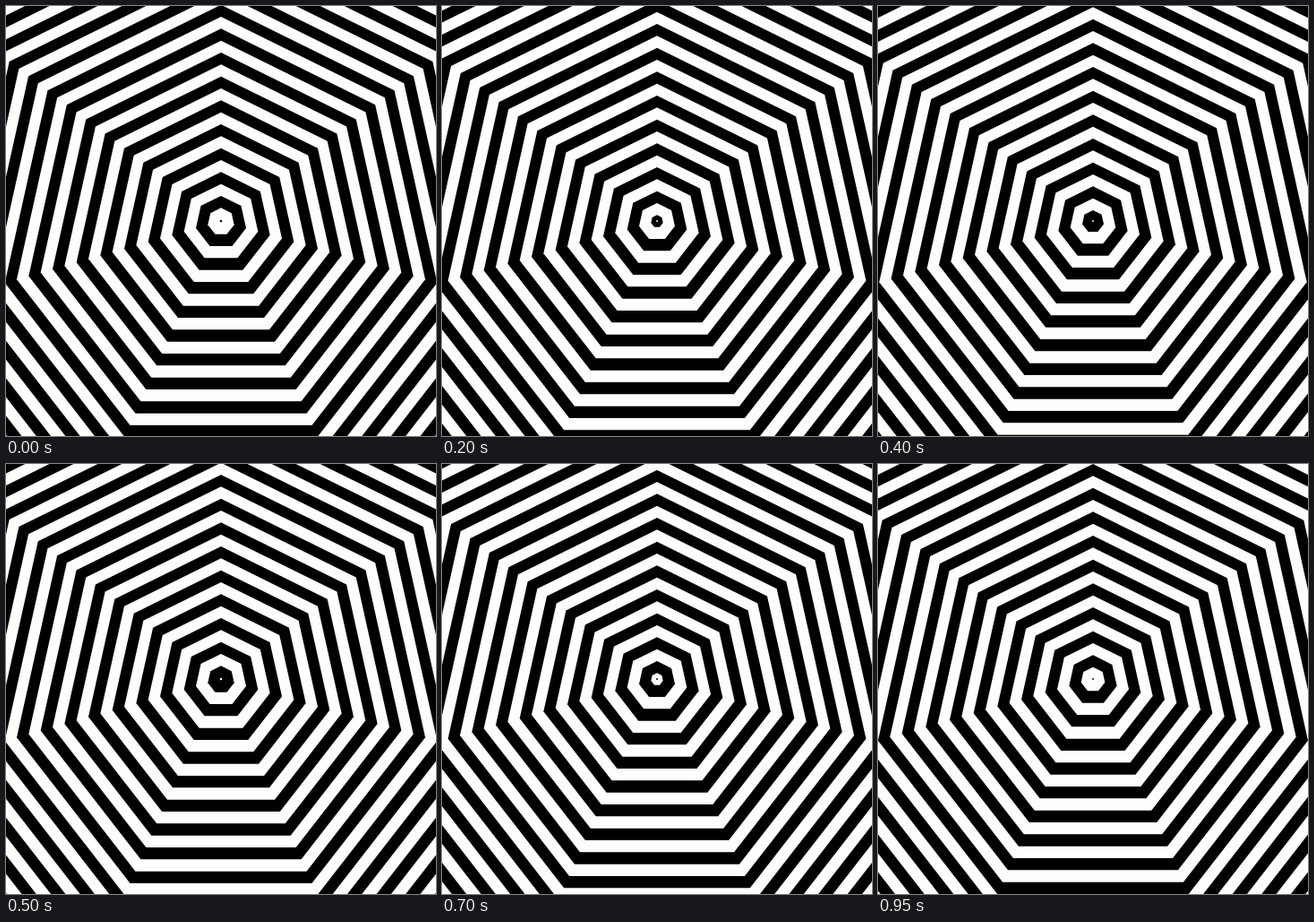
Recreate the animation shown at these times as an HTML page with a canvas. Size 480 by 480 pixels, loop 1000 ms.

```html
<!DOCTYPE html>
<html lang="en">
<head>
<meta charset="utf-8">
<title>Expanding heptagons</title>
<style>
  html, body { margin: 0; height: 100%; overflow: hidden; background: #fdfffc; }
  canvas { display: block; }
</style>
</head>
<body>
<canvas id="stage" width="480" height="480"></canvas>
<script>
const ctx = document.getElementById('stage').getContext('2d');
const CENTER = 240, RINGS = 30, BAND = 40 / 3;
const FRAMES = 20, FRAME_MS = 50, GROWTH = 2 * BAND / FRAMES;
const BLACK = '#000', WHITE = '#fdfffc', DOT = 1;

// Regular heptagon stretched to fill the square from -1 to 1
const bottom = Math.cos(Math.PI / 7);
const unit = Array.from({ length: 7 }, (_, i) => {
  const a = i * 2 * Math.PI / 7;
  return [
    Math.sin(a) / Math.sin(4 * Math.PI / 7),
    (1 - bottom - 2 * Math.cos(a)) / (1 + bottom)
  ];
});

function heptagon(r, color) {
  ctx.fillStyle = color;
  ctx.beginPath();
  for (const [x, y] of unit) ctx.lineTo(CENTER + x * r, CENTER + y * r);
  ctx.fill();
}

function draw(step) {
  const base = (step + 1) * GROWTH;
  // Paint from the outside in; the innermost one never shrinks below a dot
  for (let k = RINGS; base + k * BAND > -11; k--) {
    heptagon(Math.max(DOT, base + k * BAND), k % 2 ? WHITE : BLACK);
  }
}

const start = performance.now();
function tick() {
  const t = performance.now() - start;
  draw(Math.floor(t / FRAME_MS) % FRAMES);
  requestAnimationFrame(tick);
}
tick();
</script>
</body>
</html>
```
